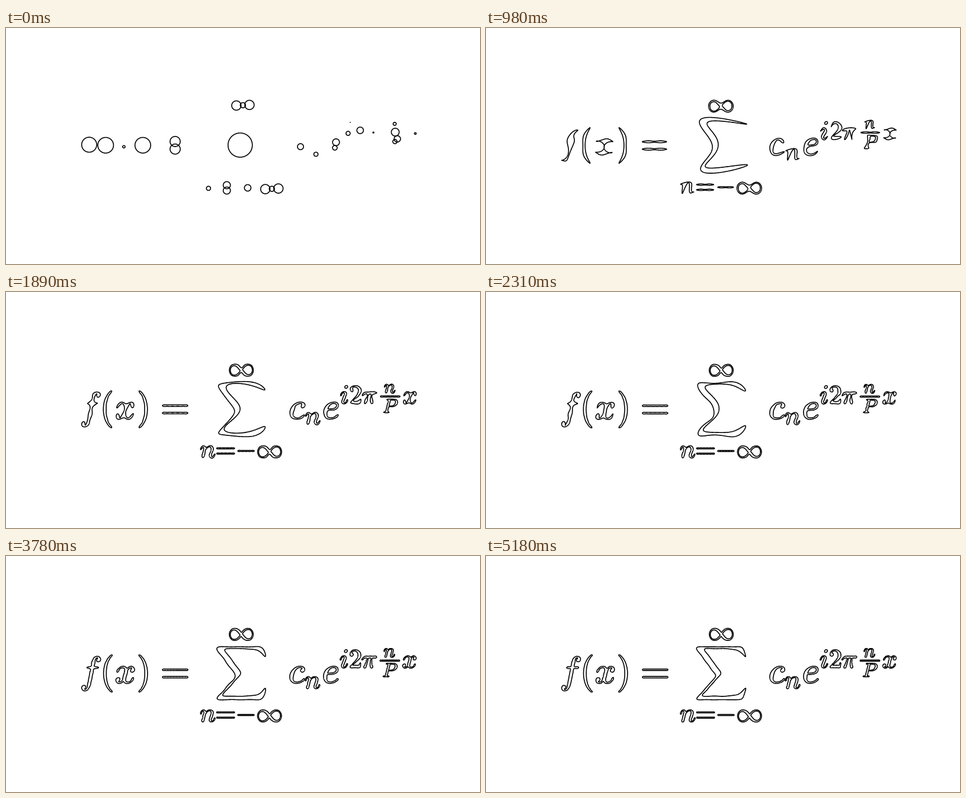
Write an HTML page with a canvas that moves like this. It is 800 px wide and 400 px high and loops after 5.25 s.

```html
<!DOCTYPE html>
<html lang="en">
<head>
<meta charset="utf-8">
<title>Fourier series drawn by Fourier series</title>
<style>
  html, body { margin: 0; width: 100%; height: 100%; overflow: hidden; background: #fff; }
  canvas { display: block; }
</style>
</head>
<body>
<canvas id="stage" width="800" height="400"></canvas>
<script>
// Glyph outlines, 1000 units per em, y up.
const GLYPHS = {
  f: 'M118 -162Q132 -168 147 -168Q160 -168 171 -155T187 -126Q197 -99 221 27T267 267T289 385H242Q195 385 192 387Q188 390 188 397L195 425Q197 430 203 430T250 431Q298 431 298 432Q298 434 307 482T319 540Q356 705 465 705Q502 703 526 683T550 630Q550 594 529 578T487 561Q443 561 443 603Q443 622 454 636T478 657L487 662Q471 668 457 668Q445 668 434 658T419 630Q412 601 403 552T387 469T380 433Q380 431 435 431Q498 431 498 424Q499 386 482 386T428 385H372L349 263Q301 15 282 -47Q255 -132 212 -173Q175 -205 139 -205Q107 -205 81 -186T55 -132Q55 -95 76 -78T118 -61Q162 -61 162 -103Q162 -122 151 -136T127 -157L118 -162Z',
  '(': 'M94 250Q94 319 104 381T127 488T164 576T202 643T244 695T277 729T302 750H319Q333 750 333 741Q333 738 316 720T275 667T226 581T184 443T167 250T184 58T225 -81T274 -167T316 -220T333 -241Q333 -250 318 -250H302L274 -226Q180 -141 137 -14T94 250Z',
  ')': 'M60 749L64 750H86L114 726Q208 641 251 514T294 250Q294 182 284 119T261 12T224 -76T186 -143T145 -194T113 -227T90 -246Q87 -249 86 -250H74Q55 -250 55 -238Q56 -237 66 -225Q221 -64 221 250T66 725Q56 737 55 738Q55 746 60 749Z',
  '=': 'M56 347Q56 360 70 367H707Q722 359 722 347Q722 336 708 328L390 327H72Q56 332 56 347ZM56 153Q56 168 72 173H708Q722 163 722 153Q722 140 707 133H70Q56 140 56 153Z',
  '-': 'M84 250Q84 263 98 270H679Q694 262 694 250T679 230H98Q84 237 84 250Z',
  '∞': 'M55 217Q55 305 111 373T254 442Q342 442 419 381Q457 350 493 303L507 284L514 294Q618 442 747 442Q833 442 888 374T944 214Q944 128 889 59T743 -11Q657 -11 580 50Q542 81 506 128L492 147L485 137Q381 -11 252 -11Q166 -11 111 57T55 217ZM907 217Q907 286 868 342T760 397Q642 397 543 238L574 198Q635 119 665 94Q714 51 766 51Q828 51 867 100T907 217ZM92 214Q92 145 131 89T239 33Q357 33 456 193L425 233Q364 312 334 337Q285 380 233 380Q171 380 132 331T92 214Z',
  'Σ': 'M60 948Q63 950 665 950H1267L1325 815Q1384 677 1388 669H1348L1341 683Q1320 724 1285 761Q1235 809 1174 838T1033 881T882 898T699 902H251L259 891Q722 258 724 252Q725 250 724 246Q721 243 460 -56L196 -356Q196 -357 407 -357Q459 -357 548 -357T676 -358Q812 -358 896 -353T1063 -332T1204 -283T1307 -196Q1328 -170 1348 -124H1388Q1388 -125 1381 -145T1356 -210T1325 -294L1267 -449L666 -450Q64 -450 61 -448Q55 -446 55 -439Q55 -437 57 -433L590 177Q590 178 557 222T452 366T322 544L56 909L55 924Q55 945 60 948Z',
  x: 'M52 289Q59 331 106 386T222 442Q257 442 286 424T329 379Q371 442 430 442Q467 442 494 420T522 361Q522 332 508 314T481 292T458 288Q439 288 427 299T415 328Q415 374 465 391Q454 404 425 404Q412 404 406 402Q368 386 350 336Q290 115 290 78Q290 50 306 38T341 26Q378 26 414 59T463 140Q466 150 469 151T485 153H489Q504 153 504 145Q504 144 502 134Q486 77 440 33T333 -11Q263 -11 227 52Q186 -10 133 -10H127Q78 -10 57 16T35 71Q35 103 54 123T99 143Q142 143 142 101Q142 81 130 66T107 46L91 40Q110 26 132 26Q168 26 194 71Q203 87 217 139T245 247T261 313Q266 340 266 352Q266 380 251 392T217 404Q177 404 142 372T93 290Q91 281 88 280T72 278H58Q52 284 52 289Z',
  n: 'M21 287Q22 293 24 303T36 341T56 388T89 425T135 442Q171 442 195 424T225 390T231 369Q231 367 232 367L243 378Q304 442 382 442Q436 442 469 415T503 336T465 179T427 52Q427 26 444 26Q450 26 453 27Q482 32 505 65T540 145Q542 153 560 153Q580 153 580 145Q580 144 576 130Q568 101 554 73T508 17T439 -10Q392 -10 371 17T350 73Q350 92 386 193T423 345Q423 404 379 404H374Q288 404 229 303L222 291L189 157Q156 26 151 16Q138 -11 108 -11Q95 -11 87 -5T76 7T74 17Q74 30 112 180T152 343Q153 348 153 366Q153 405 129 405Q91 405 66 305Q60 285 60 284Q58 278 41 278H27Q21 284 21 287Z',
  c: 'M34 159Q34 268 120 355T306 442Q362 442 394 418T427 355Q427 326 408 306T360 285Q341 285 330 295T319 325T330 359T352 380T366 386H367Q367 388 361 392T340 400T306 404Q276 404 249 390Q228 381 206 359Q162 315 142 235T121 119Q121 73 147 50Q169 26 205 26H209Q321 26 394 111Q403 121 406 121Q410 121 419 112T429 98T420 83T391 55T346 25T282 0T202 -11Q127 -11 81 37T34 159Z',
  e: 'M39 168Q39 225 58 272T107 350T174 402T244 433T307 442H310Q355 442 388 420T421 355Q421 265 310 237Q261 224 176 223Q139 223 138 221Q138 219 132 186T125 128Q125 81 146 54T209 26T302 45T394 111Q403 121 406 121Q410 121 419 112T429 98T420 82T390 55T344 24T281 -1T205 -11Q126 -11 83 42T39 168ZM373 353Q367 405 305 405Q272 405 244 391T199 357T170 316T154 280T149 261Q149 260 169 260Q282 260 327 284T373 353Z',
  i: 'M184 600Q184 624 203 642T247 661Q265 661 277 649T290 619Q290 596 270 577T226 557Q211 557 198 567T184 600ZM21 287Q21 295 30 318T54 369T98 420T158 442Q197 442 223 419T250 357Q250 340 236 301T196 196T154 83Q149 61 149 51Q149 26 166 26Q175 26 185 29T208 43T235 78T260 137Q263 149 265 151T282 153Q302 153 302 143Q302 135 293 112T268 61T223 11T161 -11Q129 -11 102 10T74 74Q74 91 79 106T122 220Q160 321 166 341T173 380Q173 404 156 404H154Q124 404 99 371T61 287Q58 278 49 278H27Q21 284 21 287Z',
  2: 'M109 429Q82 429 66 447T50 491Q50 562 103 614T235 666Q326 666 387 610T449 465Q449 422 429 383T381 315T301 241Q265 210 201 149L142 93L218 92Q375 92 385 97Q392 99 409 186V189H449V186Q448 183 436 95T421 3V0H50V31Q50 38 56 46T86 81Q115 113 136 137Q145 147 170 174T204 211T233 244T261 278T284 308T305 340T320 369T333 401T340 431T343 464Q343 527 309 573T212 619Q179 619 154 602T119 569T109 550Q109 549 114 549Q132 549 151 535T170 489Q170 464 154 447T109 429Z',
  'π': 'M132 -11Q98 -11 98 22V33L111 61Q186 219 220 334L228 358H196Q158 358 142 355T103 336Q92 329 81 318T62 297T53 285Q51 284 38 284Q19 284 19 294Q19 300 38 329T93 391T164 429Q171 431 389 431Q549 431 553 430Q573 423 573 402Q573 371 541 360Q535 358 472 358H408L405 341Q393 269 393 222Q393 170 402 129T421 65T431 37Q431 20 417 5T381 -10Q370 -10 363 -7T347 17T331 77Q330 86 330 121Q330 170 339 226T357 318T367 358H269L268 354Q268 351 249 275T206 114T175 17Q164 -11 132 -11Z',
  P: 'M287 628Q287 635 230 637Q206 637 199 638T192 648Q200 679 203 681T397 683Q587 682 600 680Q664 669 707 631T751 530Q751 453 685 389Q616 321 507 303Q500 302 402 301H307L277 182Q247 66 247 59Q247 48 305 46H336Q342 37 342 35Q342 19 335 5Q330 0 319 0Q316 0 282 1T182 2T51 1Q33 1 33 11Q40 41 44 43T67 46Q94 46 127 49Q141 52 146 61Q149 65 218 339T287 628ZM645 554Q645 567 643 575T634 597T609 619T560 635Q553 636 480 637H404Q391 635 391 627Q391 621 354 472T317 337Q317 336 378 336Q500 336 560 376Q596 400 620 455T645 554Z',
  bar: 'M0 60H1000V0H0Z'
};

// Glyph, size in px, left origin, baseline.
const FORMULA = [
  ['f', 64.5, 123.9, 215.5], ['(', 63.5, 158.4, 215], ['x', 64.5, 183, 215.5],
  [')', 63.5, 220, 215], ['=', 64.5, 260.3, 215.3],
  ['Σ', 64.1, 350.8, 214.8], ['∞', 45.5, 374.3, 142.7],
  ['n', 45.5, 326.8, 281], ['=', 45.5, 352.8, 281], ['-', 45.5, 387.2, 281], ['∞', 45.5, 422, 281],
  ['c', 64.5, 476.7, 215.3], ['n', 45.5, 503.8, 224.6], ['e', 64.5, 533.4, 215.3],
  ['i', 46.5, 562.8, 189.5], ['2', 46, 578.4, 189.5], ['π', 46, 599.4, 189.5],
  ['n', 33.5, 637.1, 171.5], ['bar', 33, 631.5, 178.4], ['P', 33.5, 635.3, 204.8],
  ['x', 46.5, 668.1, 189.7]
];

const LOOP = 5250, STEPS = 50, SLOT = 70, SAMPLES = 480, FINE = 960;
const FIT = { x: 410, y: 202, width: 564.6 };

const COS = [], SIN = [];
for (let i = 0; i < SAMPLES; i++) {
  COS.push(Math.cos(2 * Math.PI * i / SAMPLES));
  SIN.push(Math.sin(2 * Math.PI * i / SAMPLES));
}
const wrap = i => ((i % SAMPLES) + SAMPLES) % SAMPLES;

// Term order: 0, 1, -1, 2, -2, ...
const frequency = k => k % 2 ? (k + 1) / 2 : -k / 2;

// Points evenly spaced by |dx| + |dy|, as along a pixel outline.
function samplePath(d) {
  const path = document.createElementNS('http://www.w3.org/2000/svg', 'path');
  path.setAttribute('d', d);
  const step = path.getTotalLength() / FINE;
  const fine = Array.from({ length: FINE }, (_, i) => path.getPointAtLength(i * step));
  fine.push(fine[0]);

  const walked = [0];
  for (let i = 1; i <= FINE; i++) {
    const p = fine[i - 1], q = fine[i];
    walked.push(walked[i - 1] + Math.abs(q.x - p.x) + Math.abs(q.y - p.y));
  }
  let at = 0;
  return Array.from({ length: SAMPLES }, (_, i) => {
    const goal = walked[FINE] * i / SAMPLES;
    while (walked[at + 1] <= goal) at++;
    const part = (goal - walked[at]) / (walked[at + 1] - walked[at]);
    const p = fine[at], q = fine[at + 1];
    return { x: p.x + (q.x - p.x) * part, y: p.y + (q.y - p.y) * part };
  });
}

function fourier(points) {
  return Array.from({ length: STEPS }, (_, k) => {
    const freq = frequency(k);
    let re = 0, im = 0;
    points.forEach((p, i) => {
      const a = wrap(freq * i);
      re += p.x * COS[a] + p.y * SIN[a];
      im += p.y * COS[a] - p.x * SIN[a];
    });
    return { freq, re: re / SAMPLES, im: im / SAMPLES };
  });
}

const series = {};
for (const name in GLYPHS) {
  series[name] = GLYPHS[name].match(/M[^M]*/g).map(d => fourier(samplePath(d)));
}

function partialSum(coeffs, terms, size, left, base) {
  const scale = size / 1000, points = [];
  for (let i = 0; i < SAMPLES; i++) {
    let x = 0, y = 0;
    for (let k = 0; k <= terms; k++) {
      const { freq, re, im } = coeffs[k], a = wrap(freq * i);
      x += re * COS[a] - im * SIN[a];
      y += re * SIN[a] + im * COS[a];
    }
    points.push([left + x * scale, base - y * scale]);
  }
  return points;
}

const ctx = document.getElementById('stage').getContext('2d');

function draw(terms) {
  const curves = FORMULA.flatMap(([name, size, left, base]) =>
    series[name].map(c => partialSum(c, terms, size, left, base)));

  // Every picture is scaled to the same overall width.
  let x0 = Infinity, x1 = -Infinity, y0 = Infinity, y1 = -Infinity;
  for (const [x, y] of curves.flat()) {
    x0 = Math.min(x0, x); x1 = Math.max(x1, x);
    y0 = Math.min(y0, y); y1 = Math.max(y1, y);
  }
  const zoom = FIT.width / (x1 - x0);
  const dx = FIT.x - zoom * (x0 + x1) / 2, dy = FIT.y - zoom * (y0 + y1) / 2;

  ctx.fillStyle = '#fff';
  ctx.fillRect(0, 0, 800, 400);
  ctx.strokeStyle = '#000';
  ctx.lineWidth = 1.6;
  ctx.lineJoin = 'round';
  for (const curve of curves) {
    ctx.beginPath();
    for (const [x, y] of curve) ctx.lineTo(dx + zoom * x, dy + zoom * y);
    ctx.closePath();
    ctx.stroke();
  }
}

// A new term every slot and a half.
function termsAt(time) {
  const slot = Math.floor(time % LOOP / SLOT);
  return Math.max(1, Math.floor(slot / 1.5));
}

let shown = 0;
function tick() {
  const terms = termsAt(performance.now());
  if (terms !== shown) draw(shown = terms);
  requestAnimationFrame(tick);
}
tick();
</script>
</body>
</html>
```
